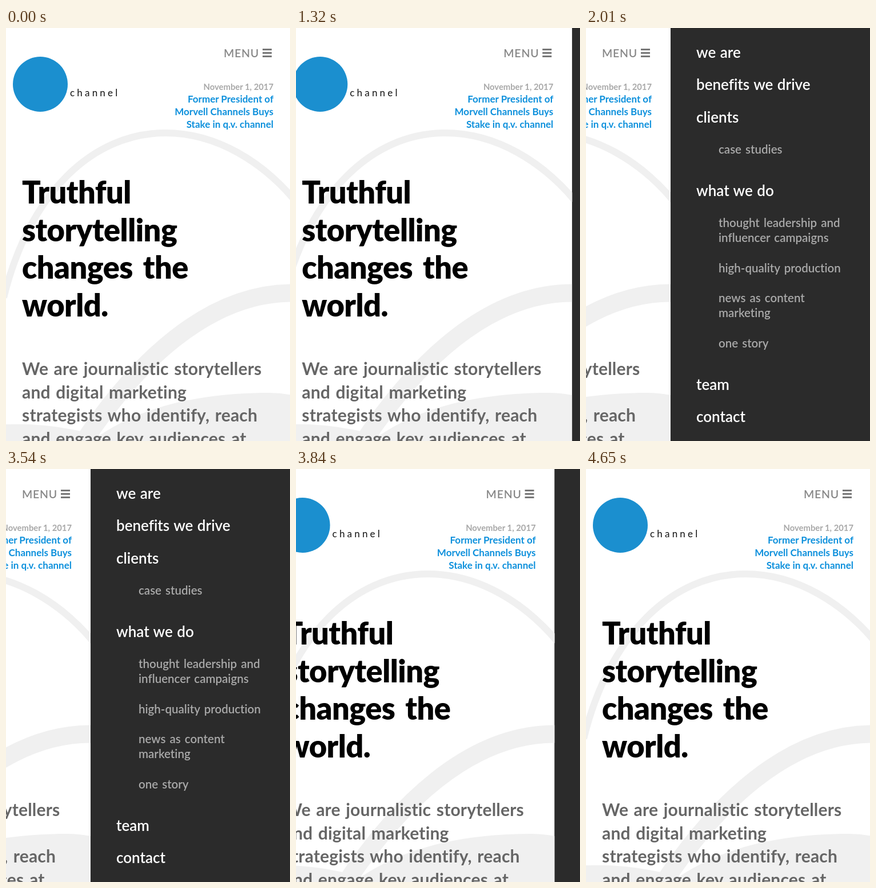
An HTML page that plays this animation: 497x720 px, repeating every 8 s.

```html
<!DOCTYPE html>
<html lang="en">
<head>
<meta charset="utf-8">
<title>Sliding menu</title>
<style>
  html, body { margin: 0; width: 100%; height: 100%; overflow: hidden; background: #2b2b2b; }
  svg { display: block; width: 497px; height: 720px; font-family: Lato, "Open Sans", sans-serif; font-variant-ligatures: none; }
  .link { font-size: 26px; font-weight: 600; word-spacing: 1px; fill: #fff; }
  .sub { font-size: 20.5px; font-weight: 600; word-spacing: 2px; fill: #a9a9a9; }
  .title { font-size: 54px; font-weight: 900; letter-spacing: -.5px; word-spacing: 6px; fill: #000; }
  .intro { font-size: 30px; font-weight: 700; letter-spacing: .2px; word-spacing: 2px; fill: #666; }
  .date { font-size: 14.8px; font-weight: 700; text-anchor: end; fill: #a8a8a8; }
  .news { font-size: 17px; font-weight: 700; text-anchor: end; fill: #0d90dc; }
  .menu { font-size: 19.5px; font-weight: 600; letter-spacing: .8px; fill: #888; }
  .brand { font-size: 17px; letter-spacing: 4.2px; fill: #111; }
</style>
</head>
<body>
<svg viewBox="0 0 497 720">
  <clipPath id="sheet"><rect width="501" height="720"/></clipPath>
  <rect width="497" height="720" fill="#2b2b2b"/>
  <g id="nav"></g>
  <g id="page" clip-path="url(#sheet)">
    <rect width="501" height="720" fill="#fff"/>
    <g fill="none" stroke="#f0f0f0">
      <path stroke-width="12" d="M-4 470C40 290 150 183 279 183C370 183 450 235 505 300"/>
      <path stroke-width="31" d="M120 745C225 580 355 462 501 462"/>
    </g>
    <g fill="#f0f0f0">
      <path d="M150 720C230 660 340 636 460 636Q480 636 501 640V720Z"/>
      <path d="M0 691C60 689 110 695 200 720H0Z"/>
    </g>
    <circle cx="60" cy="98" r="48" fill="#1b8fcf"/>
    <path d="M449 37.5h16M449 43.5h16M449 49.5h16" stroke="#777" stroke-width="3"/>
  </g>
</svg>
<script>
const LOOP = 8000, SLIDE = 450, OPEN_AT = 1291, CLOSE_AT = 3585, DISTANCE = 353;
const nav = document.getElementById("nav");
const page = document.getElementById("page");

function addLines(parent, style, x, y, pitch, ...lines) {
  lines.forEach((line, i) => {
    const text = document.createElementNS("http://www.w3.org/2000/svg", "text");
    text.setAttribute("class", style);
    text.setAttribute("x", x);
    text.setAttribute("y", y + i * pitch);
    text.textContent = line;
    parent.append(text);
  });
}

addLines(nav, "link", 193, 52, 56.4, "we are", "benefits we drive", "clients");
addLines(nav, "sub", 232, 219, 0, "case studies");
addLines(nav, "link", 193, 293, 0, "what we do");
addLines(nav, "sub", 232, 347, 26, "thought leadership and", "influencer campaigns");
addLines(nav, "sub", 232, 426, 0, "high-quality production");
addLines(nav, "sub", 232, 478, 26, "news as content", "marketing");
addLines(nav, "sub", 232, 557, 0, "one story");
addLines(nav, "link", 193, 631, 56, "team", "contact");

addLines(page, "brand", 112, 119, 0, "channel");
addLines(page, "menu", 381, 51, 0, "MENU");
addLines(page, "date", 468, 108, 0, "November 1, 2017");
addLines(page, "news", 468, 130, 22,
  "Former President of", "Morvell Channels Buys", "Stake in q.v. channel");
addLines(page, "title", 28, 306, 65.7, "Truthful", "storytelling", "changes the", "world.");
addLines(page, "intro", 28, 605, 40.6, "We are journalistic storytellers",
  "and digital marketing", "strategists who identify, reach", "and engage key audiences at");

// Equivalent to the CSS "ease" curve: cubic-bezier(.25, .1, .25, 1).
function ease(x) {
  if (x <= 0) return 0;
  if (x >= 1) return 1;
  let low = 0, high = 1;
  for (let i = 0; i < 20; i++) {
    const mid = (low + high) / 2;
    if (.75 * mid * (1 - mid) + mid ** 3 < x) low = mid; else high = mid;
  }
  const s = low, r = 1 - s;
  return .3 * s * r * r + 3 * s * s * r + s ** 3;
}

function draw(now) {
  const t = now % LOOP;
  const opened = ease((t - OPEN_AT) / SLIDE) - ease((t - CLOSE_AT) / SLIDE);
  page.setAttribute("transform", `translate(${-DISTANCE * opened} 0)`);
  requestAnimationFrame(() => draw(performance.now() - start));
}

const start = performance.now();
draw(0);
</script>
</body>
</html>
```
